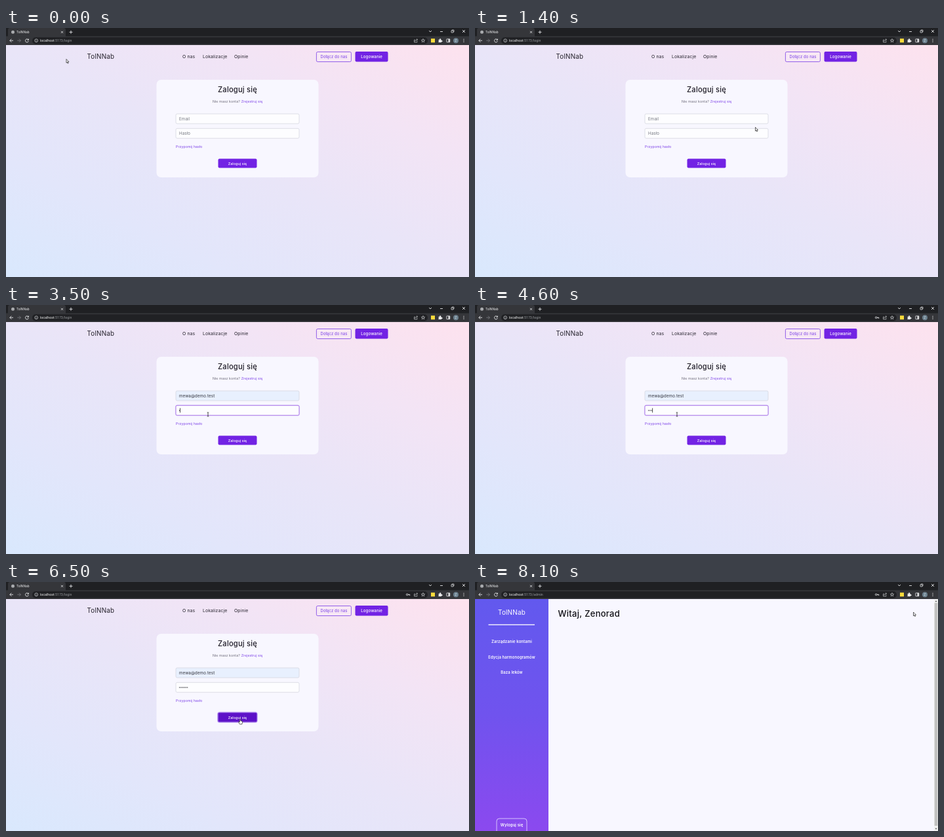
An HTML page with a canvas for the animation above (8900 ms loop, 706x380 px).

```html
<!DOCTYPE html>
<html lang="pl">
<head>
<meta charset="utf-8">
<title>TolNNab</title>
<style>
html, body { margin: 0; width: 100%; height: 100%; overflow: hidden; background: #ebe5f8; }
canvas { display: block; width: 706px; height: 380px; }
</style>
</head>
<body>
<canvas id="stage" width="706" height="380"></canvas>
<script>
const ctx = document.getElementById('stage').getContext('2d');
const W = 706, H = 380, TOP = 26, LOOP = 8900, STEP = 100;
const BRAND = 'TolNNab', EMAIL = 'mewa@demo.test', USER = 'Zenorad';
const UI = 'Inter, sans-serif', CHROME = 'Roboto, sans-serif';
const PURPLE = '#7223e4', LINK = '#7a3ee6', INK = '#25222c', PAPER = '#f8f7ff';

// Pointer waypoints: time, x, y
const route = [
  [0, 92, 47.5], [200, 165, 57], [500, 515, 108], [700, 617, 125],
  [800, 617, 125], [1000, 575, 131], [1400, 427.5, 151.5], [1600, 335, 150], [1700, 312, 138],
  [1900, 312, 138], [2200, 320, 150], [2500, 325.5, 163.5], [2700, 325.5, 163.5],
  [3000, 308, 167], [5800, 308, 167], [6100, 325, 182], [6400, 357, 209],
  [6700, 357, 209], [6800, 354.5, 209.5], [7200, 354.5, 209.5],
  [7500, 430, 170], [7800, 595, 84], [8100, 668.5, 46], [LOOP, 668.5, 46]
];
const keyTimes = [3500, 4000, 4300, 4600, 4800, 5000, 5200, 5400];

function pointer(t) {
  const i = route.findIndex(p => p[0] > t);
  const [t0, x0, y0] = route[i - 1], [t1, x1, y1] = route[i];
  const k = (t - t0) / (t1 - t0);
  return [x0 + (x1 - x0) * k, y0 + (y1 - y0) * k];
}

function text(str, x, y, size, color, { weight = 400, align = 'left', font = UI } = {}) {
  ctx.font = `${weight} ${size}px ${font}`;
  ctx.letterSpacing = font === UI ? `${size * 0.02}px` : '0px';
  ctx.textAlign = align;
  ctx.fillStyle = color;
  ctx.fillText(str, x, y);
}

function rect(x, y, w, h, color) {
  ctx.fillStyle = color;
  ctx.fillRect(x, y, w, h);
}

function box(x, y, w, h, r, fill, border, line = 0.8) {
  ctx.beginPath();
  ctx.roundRect(x, y, w, h, r);
  if (fill) { ctx.fillStyle = fill; ctx.fill(); }
  if (border) { ctx.strokeStyle = border; ctx.lineWidth = line; ctx.stroke(); }
}

function disc(x, y, r, fill, stroke) {
  ctx.beginPath();
  ctx.arc(x, y, r, 0, Math.PI * 2);
  if (fill) { ctx.fillStyle = fill; ctx.fill(); }
  if (stroke) { ctx.strokeStyle = stroke; ctx.lineWidth = 0.8; ctx.stroke(); }
}

function path(d, x, y, { fill, stroke, line = 0.9 } = {}) {
  const shape = new Path2D(d);
  ctx.save();
  ctx.translate(x, y);
  if (fill) { ctx.fillStyle = fill; ctx.fill(shape); }
  if (stroke) { ctx.strokeStyle = stroke; ctx.lineWidth = line; ctx.stroke(shape); }
  ctx.restore();
}

function linear(x0, y0, x1, y1, ...colors) {
  const g = ctx.createLinearGradient(x0, y0, x1, y1);
  colors.forEach((c, i) => g.addColorStop(i / (colors.length - 1), c));
  return g;
}

function drawBrowser(page, hasKey) {
  const light = { stroke: '#e4e5e7' }, soft = { stroke: '#b9bbbe', line: 0.8 };
  rect(0, 0, W, 13, '#1f2023');
  box(3, 0, 88, 16, 3, '#35363a');
  rect(0, 12.5, W, TOP - 12.5, '#35363a');
  disc(10.5, 6.3, 2.5, '#a9abae');
  text(BRAND, 16, 8.1, 5, '#e4e5e7', { font: CHROME });
  path('M-1.5-1.5L1.5 1.5M1.5-1.5L-1.5 1.5', 85.5, 6.3, light);
  path('M-2.5 0H2.5M0-2.5V2.5', 99, 6.3, light);
  path('M-2-1L0 1L2-1', 647, 5, light);
  path('M-2 0.5H2', 664, 5, light);
  path('M-2-1H1V2H-2ZM-1-1V-2H2V1H1', 681, 5, { ...light, line: 0.7 });
  path('M-2-2L2 2M2-2L-2 2', 698, 5, light);

  path('M2.7 0H-2.5M0-2.5L-2.5 0L0 2.5', 8.3, 19.2, light);
  path('M-2.7 0H2.5M0-2.5L2.5 0L0 2.5', 20, 19.2, { stroke: '#77797d' });
  path('M2-1.4A2.5 2.5 0 1 0 2.4 0.8M2.4-2.7V-0.8H0.5', 32, 19.2, light);
  box(40, 14.2, 603, 10.2, 5, '#202124');
  disc(46.2, 19.2, 2.4, null, '#c3c5c8');
  path('M0-1.4V-0.7M0-0.2V1.4', 46.2, 19.2, { stroke: '#c3c5c8', line: 0.7 });
  const opts = { font: CHROME };
  text('localhost', 52, 21, 5.3, '#eeeeef', opts);
  const host = ctx.measureText('localhost').width;
  text(':5173/' + page, 52 + host, 21, 5.3, '#94979b', opts);

  if (hasKey) {
    disc(611.6, 19.2, 1.3, null, '#e4e5e7');
    path('M0 0H3V1.4M1.8 0V1', 612.8, 19.2, light);
  }
  path('M-1-1H-2.5V2.5H2V1M-1 1Q-0.5-1.4 2.5-1.4M1-2.8L2.6-1.4L1 0', 625, 19.2, soft);
  path('M0-2.7L0.8-0.9L2.7-0.8L1.2 0.5L1.7 2.4L0 1.3L-1.7 2.4L-1.2 0.5L-2.7-0.8L-0.8-0.9Z', 636, 19.2, { stroke: '#d2d4d6', line: 0.7 });
  rect(648, 16.2, 6, 6, '#fbdc3c');
  path('M-2.5-1.5H-0.8A1 1 0 1 1 1-1.5H2V0A1 1 0 1 1 2 1.5V2.7H-2.5V1.3A1 1 0 0 0-2.5-0.3Z', 662, 19.2, { fill: '#e8e9ea' });
  box(671.8, 16.8, 5, 4.8, 0.4, null, '#e4e5e7');
  rect(674.5, 16.8, 2.3, 4.8, '#e4e5e7');
  disc(686, 19.2, 4, '#6d8290');
  text(USER[0], 686, 20.9, 4.6, '#dbe3e8', { align: 'center', font: CHROME });
  [-2, 0, 2].forEach(dy => disc(698, 19.2 + dy, 0.6, '#e4e5e7'));
}

function drawField(y, value, color, { fill = '#fdfdff', focus = false, size = 6.2, font = UI } = {}) {
  if (focus) box(258.4, y - 0.6, 189.2, 16.2, 2.5, null, 'rgba(140,80,230,.22)', 1);
  box(259, y, 188, 15, 2, fill, focus ? '#9a5ee2' : '#d6d7e0');
  text(value, 264, y + 9.6, size, color, { font });
}

function drawLogin(t) {
  rect(0, TOP, W, H - TOP, linear(211, 486, 495, -80, '#d9e8fd', '#e2e6fb', '#e9e5f8', '#f3e4f5', '#fde2ee'));

  text(BRAND, 123.5, 47, 9.9, INK);
  [['O nas', 269], ['Lokalizacje', 300], ['Opinie', 348]].forEach(([s, x]) => text(s, x, 46.2, 6.8, INK));
  box(473.4, 36.5, 53, 15, 2, 'rgba(255,255,255,.15)', LINK);
  text('Dołącz do nas', 500, 46.2, 5.9, LINK, { align: 'center' });
  box(532.5, 36, 50, 15.5, 2, PURPLE);
  text('Logowanie', 557.6, 45.8, 6.1, '#fff', { weight: 500, align: 'center' });

  box(229.5, 79, 247, 149, 7, PAPER);
  text('Zaloguj się', 353, 98.4, 11.1, '#1f1c26', { weight: 500, align: 'center' });
  text('Nie masz konta?', 315, 114.3, 5.2, '#6d6b78');
  text('Zrejestruj się', 358.8, 114.3, 5.1, LINK);

  const emailFocus = t >= 1700 && t < 3000;
  if (t < 2400) drawField(131, 'Email', '#74777f', { focus: emailFocus });
  else if (t < 2800) drawField(131, EMAIL, '#16161a', { fill: '#e8f0fe', focus: true, size: 5.3, font: CHROME });
  else drawField(131, EMAIL, '#30323a', { fill: '#e8f0fe', focus: emailFocus });

  const typed = keyTimes.filter(k => k <= t).length;
  const passFocus = t >= 3000 && t < 6400;
  drawField(153.3, typed ? '' : 'Hasło', '#74777f', { focus: passFocus });
  const caretAt = n => 263.6 + 1.75 * n;
  for (let i = 0; i < typed; i++) disc(caretAt(i + 0.5), 160.9, 0.62, '#26262c');
  if (passFocus) rect(caretAt(typed) - 0.3, 157.3, 0.8, 7, '#222');

  text('Przypomij hasło', 259, 183.2, 5.2, LINK);
  const hover = t >= 6300;
  if (t >= 6400) box(322.9, 199, 60, 15, 2.8, null, '#b08af0', 1.4);
  box(323.5, 199.6, 59, 13.8, 2, hover ? '#5d12c8' : PURPLE);
  text('Zaloguj się', 353, 208.6, 5.3, '#fff', { weight: 500, align: 'center' });
}

function drawAdmin() {
  rect(0, TOP, W, H - TOP, PAPER);
  rect(0, TOP, 112, H - TOP, linear(0, TOP, 0, H, '#6259ee', '#7053ee', '#8b49ef'));
  const center = { align: 'center', weight: 600 };
  text(BRAND, 56, 50, 9.9, '#fff', { align: 'center' });
  rect(20.5, 64.6, 70.5, 1.3, '#fff');
  ['Zarządzanie kontami', 'Edycja harmonogramów', 'Baza leków'].forEach((s, i) =>
    text(s, 56, 93.1 + i * 23.6, 5.9, '#fff', center));
  box(33, 361, 46, 24, 4, null, '#e9e0ff');
  text('Wyloguj się', 56, 373.2, 5.9, '#fff', center);
  text('Witaj, ' + USER, 126.5, 53.2, 13, '#111015', { weight: 500 });

  rect(700, TOP, 6, H - TOP, '#f1f1f1');
  rect(700.7, 32, 4.6, 340, '#c1c1c1');
  path('M-1.5 1L0-1L1.5 1Z', 703, 29.3, { fill: '#555' });
  path('M-1.5-1L0 1L1.5-1Z', 703, 376.8, { fill: '#555' });
}

function drawPointer(t) {
  const [x, y] = pointer(t);
  const overEmail = t >= 1700 && t < 2200;
  const overPass = t >= 2900 && t < 6000;
  if (overEmail || overPass) {
    path('M-1.3-3H-0.3L0-2.7L0.3-3H1.3M0-2.7V2.7M-1.3 3H-0.3L0 2.7L0.3 3H1.3', x, y, { stroke: '#222', line: 0.8 });
  } else if (t >= 6300 && t < 6800) {
    path('M-0.7 0.6Q0-0.6 0.7 0.6V2.8L3.1 3.5Q3.7 3.8 3.5 5L2.8 8H-0.6L-2.4 5Q-2.6 4-1.5 4.4L-0.7 5Z',
      x, y, { fill: '#fff', stroke: '#222', line: 0.7 });
  } else {
    path('M0 0V5.7L1.3 4.6L2.2 6.6L3.1 6.2L2.2 4.2H4Z', x, y, { fill: '#fff', stroke: '#222', line: 0.7 });
  }
}

function draw(t) {
  const admin = t >= 6800;
  ctx.clearRect(0, 0, W, H);
  if (admin) drawAdmin(); else drawLogin(t);
  drawBrowser(admin ? 'admin' : 'login', t >= 3600);
  drawPointer(t);
}

const start = performance.now();
function tick() {
  const t = (performance.now() - start) % LOOP;
  draw(Math.floor(t / STEP) * STEP);
  requestAnimationFrame(tick);
}
tick();
</script>
</body>
</html>
```
